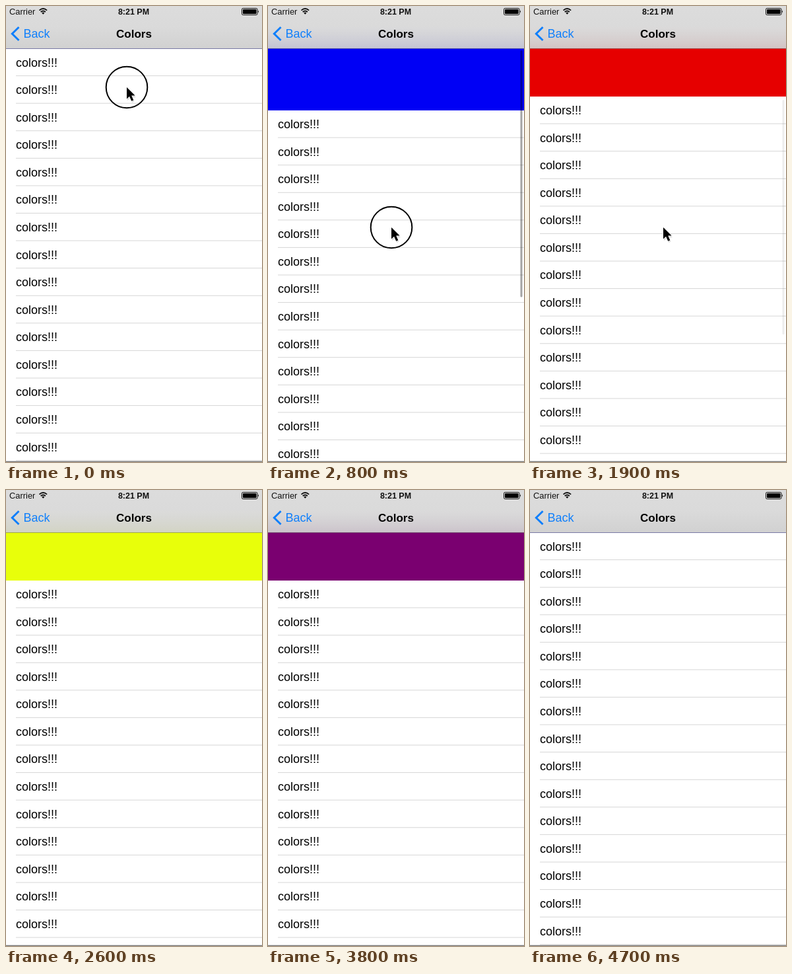
These frames come from a looping animation (388 by 690 pixels, 5 s). An HTML page:

```html
<!DOCTYPE html>
<html lang="en">
<head>
<meta charset="utf-8">
<title>Pull to refresh</title>
<style>
  html, body { margin: 0; width: 100%; height: 100%; overflow: hidden; background: #fff; }
  svg { display: block; width: 388px; height: 690px; }
  text { font-family: "Liberation Sans", Arial, sans-serif; font-size: 18px; }
</style>
</head>
<body>
<svg viewBox="0 0 388 690">
  <defs>
    <linearGradient id="barFill" x2="0" y2="1">
      <stop offset="0" stop-color="#dcdcdc"/>
      <stop offset=".5" stop-color="#dadada"/>
      <stop offset="1" stop-color="#d1d1d1"/>
    </linearGradient>
    <linearGradient id="barTint" x2="0" y2="1">
      <stop offset=".35" stop-color="#fff" stop-opacity="0"/>
      <stop id="tintStop" offset="1" stop-opacity=".07"/>
    </linearGradient>
  </defs>

  <rect width="388" height="690" fill="#fff"/>
  <rect id="panel" y="64" width="388" height="0"/>
  <g id="rows"></g>
  <rect id="scrollbar" x="382.5" width="3" rx="1.5" fill="#000"/>

  <rect width="388" height="64.5" fill="url(#barFill)"/>
  <rect id="tint" width="388" height="64.5" fill="url(#barTint)"/>
  <rect y="64" width="388" height="1" fill="#000" opacity=".28"/>

  <text x="5" y="13.3" style="font-size:12.9px" fill="#111">Carrier</text>
  <g fill="none" stroke="#111" stroke-width="1.8">
    <path d="M50.5 6.6Q56.3 1.4 62.1 6.6M52.7 9Q56.3 5.9 59.9 9"/>
    <path d="M56.3 12.8L54.2 10.4Q56.3 8.8 58.4 10.4Z" fill="#111" stroke="none"/>
  </g>
  <text x="193.5" y="13.3" text-anchor="middle" font-weight="bold" style="font-size:12.5px" fill="#111">8:21 PM</text>
  <rect x="357.5" y="3.5" width="23.5" height="10" rx="1.8" fill="none" stroke="#111"/>
  <rect x="359" y="5" width="20.5" height="7" rx=".7" fill="#000"/>
  <path d="M382 6.8Q384 8.5 382 10.2Z" fill="#111"/>

  <path d="M19.5 32L9.3 42L19.5 52" fill="none" stroke="#0f7ffb" stroke-width="3"/>
  <text x="26.5" y="48" fill="#0f7ffb">Back</text>
  <text x="194" y="48" text-anchor="middle" font-weight="bold" style="font-size:17px">Colors</text>

  <g id="pointer">
    <circle id="touch" r="31.3" fill="none" stroke="#000" stroke-width="2"/>
    <path d="M1 2V20L5 16.4L8.2 23L11.5 21.6L8.5 15.2H14Z" fill="#000" opacity=".14"/>
    <path d="M0 0V17.6L4.1 13.8L7.2 20.8L10.3 19.4L7.2 12.6H12.6Z" stroke="#fff" stroke-width="1.2" paint-order="stroke"/>
  </g>
  <rect y="688.7" width="388" height="1.3" fill="#777"/>
</svg>

<script>
const LOOP = 5000, STEP = 100, BAR = 64.5, ROW = 41.58, REST = 72.5, PEAK = 93.5;
const $ = id => document.getElementById(id);
const set = (id, attrs) => {
  for (const name in attrs) $(id).setAttribute(name, attrs[name]);
};
const mix = (a, b, p) => a + (b - a) * p;
const progress = (t, from, to) => Math.min(1, Math.max(0, (t - from) / (to - from)));
const smooth = p => p * p * (3 - 2 * p);
const easeOut = p => 1 - (1 - p) ** 3;

const colorStops = [
  [1000, [0, 0, 245]],
  [1900, [230, 0, 0]],
  [2600, [232, 255, 10]],
  [3100, [22, 255, 255]],
  [3800, [122, 0, 112]],
  [4500, [0, 0, 245]]
];

function colorAt(t) {
  let i = 0;
  while (i < colorStops.length - 2 && t > colorStops[i + 1][0]) i++;
  const [from, a] = colorStops[i], [to, b] = colorStops[i + 1];
  const p = progress(t, from, to);
  return `rgb(${a.map((v, k) => Math.round(mix(v, b[k], p)))})`;
}

// The finger drags the list down, lets go, and the list closes after refreshing.
const dragAt = t => smooth(progress(t, 50, 750));

function offsetAt(t) {
  if (t < 1000) {
    const d = dragAt(t);
    return PEAK * d * (1.16 - .16 * d);
  }
  if (t < 4200) return mix(PEAK, REST, easeOut(progress(t, 1000, 1400)));
  return REST * (1 - smooth(progress(t, 4220, 4660)));
}

function buildRows() {
  let markup = "";
  for (let i = 0; i < 15; i++) {
    const top = i * ROW;
    markup += `<text x="15" y="${top + 27}">colors!!!</text>` +
      `<rect x="15" y="${top + 40.6}" width="373" height="1" fill="#d6d6d6"/>`;
  }
  $("rows").innerHTML = markup;
}

function draw(t) {
  const offset = offsetAt(t), color = colorAt(t);
  set("rows", { transform: `translate(0 ${BAR + offset})` });
  set("panel", { height: offset + .5, fill: color });
  set("tintStop", { "stop-color": color });
  set("tint", { opacity: Math.min(1, offset / 30) });

  const settled = smooth(progress(t, 1000, 1400));
  const barTop = mix(67, 142, settled);
  const barEnd = mix(534 - offset, 497, settled);
  const fade = progress(t, 50, 200) * (1 - progress(t, 1500, 2000));
  set("scrollbar", { y: barTop, height: barEnd - barTop, opacity: .36 * fade });

  const x = mix(183, 187, dragAt(t)) + 15 * smooth(progress(t, 1100, 1800));
  const y = mix(123, 335, dragAt(t));
  set("pointer", {
    transform: `translate(${x} ${y})`,
    visibility: t < 2100 ? "visible" : "hidden"
  });
  set("touch", { opacity: t < 1000 ? 1 : 0 });
}

function tick(now) {
  draw(Math.floor((now - start) % LOOP / STEP) * STEP);
  requestAnimationFrame(tick);
}

buildRows();
draw(0);
const start = performance.now();
requestAnimationFrame(now => tick(Math.max(now, start)));
</script>
</body>
</html>
```
